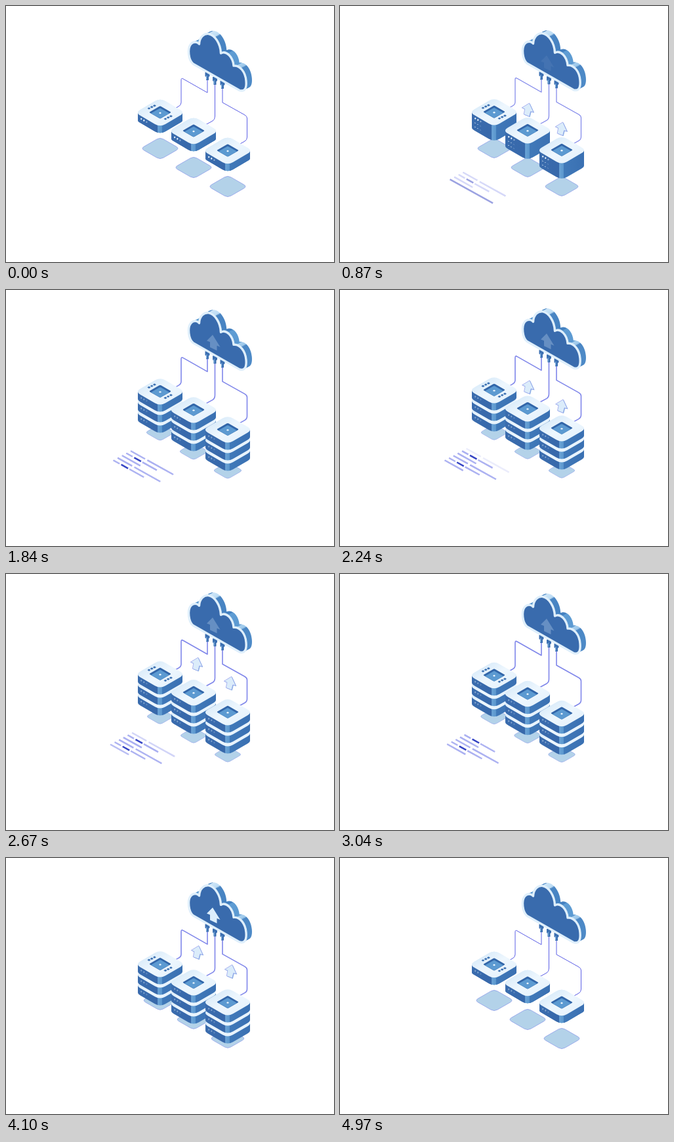
Write an HTML page that moves like this. It is 500 px wide and 390 px high and loops after 5000 ms.

```html
<!DOCTYPE html>
<html lang="en">
<head>
<meta charset="utf-8">
<title>Cloud servers</title>
<style>
html, body { margin: 0; width: 100%; height: 100%; overflow: hidden; background: #fff; }
svg { display: block; width: 500px; height: 390px; }
</style>
</head>
<body>
<svg id="stage" viewBox="0 0 500 390">
  <defs>
    <linearGradient id="side" gradientUnits="userSpaceOnUse" x1="-34" x2="34" y1="0" y2="0">
      <stop offset="0" stop-color="#3a6cae"/><stop offset=".44" stop-color="#3768aa"/>
      <stop offset=".45" stop-color="#6aa3d6"/><stop offset=".54" stop-color="#5a96cd"/>
      <stop offset=".55" stop-color="#4079b9"/><stop offset="1" stop-color="#3a70b2"/>
    </linearGradient>
    <linearGradient id="lid" x1="0" y1="0" x2="1" y2="1">
      <stop offset="0" stop-color="#cfe5f7"/><stop offset=".5" stop-color="#eef7fe"/><stop offset="1" stop-color="#e2f0fb"/>
    </linearGradient>
    <linearGradient id="rim" gradientUnits="userSpaceOnUse" x1="280" x2="377" y1="0" y2="0">
      <stop offset=".2" stop-color="#5b99d1"/><stop offset=".27" stop-color="#4a86c4"/>
      <stop offset=".28" stop-color="#cfe6f8"/><stop offset=".38" stop-color="#bcdcf4"/>
      <stop offset=".39" stop-color="#4a86c4"/><stop offset=".58" stop-color="#4380c0"/>
      <stop offset=".59" stop-color="#5f9dd4"/><stop offset=".72" stop-color="#5b99d1"/>
      <stop offset=".73" stop-color="#a9d0ee"/><stop offset=".79" stop-color="#9cc7ea"/>
      <stop offset=".8" stop-color="#4a86c4"/><stop offset="1" stop-color="#5390cb"/>
    </linearGradient>
  </defs>
  <g id="shadows"></g>
  <g id="float">
    <g id="cables" fill="none" stroke-linejoin="round"></g>
    <g id="arrows"></g>
    <g id="cloud"></g>
    <g id="servers"></g>
    <g id="code" fill="none"></g>
  </g>
</svg>
<script>
const LOOP = 5000;
const $ = id => document.getElementById(id);
const clamp = v => Math.min(1, Math.max(0, v));
const ramp = (t, from, to) => clamp((t - from) / (to - from));
const ease = p => (1 - Math.cos(Math.PI * p)) / 2;
const swell = p => Math.sin(Math.PI * p) ** 2;

// Isometric tile with rounded corners; w and h are the half sizes before rounding.
function tile(w, h, x = 0, y = 0, cut = 0.21) {
  const corners = [[0, -h], [w, 0], [0, h], [-w, 0]];
  const mix = (a, b) => [0, 1].map(k => a[k] + (b[k] - a[k]) * cut);
  const at = p => `${(p[0] + x).toFixed(2)} ${(p[1] + y).toFixed(2)}`;
  return corners.map((c, i) => {
    const prev = corners[(i + 3) % 4], next = corners[(i + 1) % 4];
    return `${i ? 'L' : 'M'}${at(mix(c, prev))}Q${at(c)} ${at(mix(c, next))}`;
  }).join('') + 'Z';
}

const SPOTS = [[235, 162.5, 217], [286, 190.5, 246], [338, 220.5, 275]];
const BODY = 11, PITCH = 16;

const leds = `<g class="led" fill="#eaf5ff">${[0, 1, 2].map(i =>
  `<ellipse cx="${-28.8 + i * 4.1}" cy="${9.6 + i * 2.3}" rx="1.1" ry="1.3" opacity="${i < 2 ? 1 : 0.5}"/>`).join('')}</g>`;
const box = `<path fill="url(#side)" d="${tile(38, 22, 0, BODY)}M-34 0H34V${BODY}H-34Z"/>
  <path fill="url(#lid)" d="${tile(38, 22)}"/>${leds}`;
const chip = `<path fill="#3266a9" d="${tile(17, 9.8, 0, -0.5, 0.08)}"/>
  <path fill="#5c9ad1" d="${tile(14, 8, 0, 1, 0.08)}"/>
  <ellipse cy=".5" rx="1.6" ry="1.2" fill="#eef8ff"/>`;
const vents = [[-17, -6.5], [8, 9.5]].map(([x, y]) => [0, 1, 2].map(i =>
  `<path fill="#3a6fb1" d="${tile(2.6, 1.7, x + i * 4.2, y - i * 2.1, 0.05)}"/>`).join('')).join('');

$('servers').innerHTML = SPOTS.map(([x, y], n) => `<g transform="translate(${x} ${y})">
  ${[2, 1, 0].map(k => `<g class="layer" data-k="${k}">${box}</g>`).join('')}
  ${chip}${n ? '' : vents}</g>`).join('');
$('shadows').innerHTML = SPOTS.map(() =>
  `<path d="${tile(29.5, 17, 0, 0, 0.17)}" fill="#b3d2e9" stroke="#8f9eea" stroke-width=".8"/>`).join('');

$('cables').innerHTML = [
  'M307 110V132L270 111Q267 109 267 113V147Q267 151 263 153L256 157',
  'M318.5 118V168Q318.5 173 315 175L304 181',
  'M330 124V147L364 166Q367.5 168 367.5 171V200Q367.5 204 364 206L355 211'
].map(d => `<path d="${d}"/>`).join('');

const CLOUD = 'M285 88C278 82 276.500 65 281.500 58.500C285 54 291 54 294.500 58C295 47 302 41.500 309 42.500' +
  'C318 44 327 57 327.500 72C336 67 346 78 347 91C357 90 365 101 366 114C367 125 364 131 356 128.500Z';
const rim = Array.from({ length: 11 }, (_, i) =>
  `<path d="${CLOUD}" fill="url(#rim)" transform="translate(${8.8 - i * 0.88} ${-4.6 + i * 0.46})"/>`).join('');
const plugs = [[307, 101], [318.5, 108], [330, 114]].map(([x, y]) =>
  `<path fill="#3c70b2" d="M${x - 3.5} ${y}h7v6l-1.500 1v5h-4v-5l-1.500 -1z"/>
   <path fill="#7fb0de" d="M${x - 2} ${y + 5}h1.300v6h-1.300z"/>`).join('');
$('cloud').innerHTML = `${plugs}${rim}
  <path d="${CLOUD}" fill="#396bad" stroke="#dfeffb" stroke-width="3.400" stroke-linejoin="round"/>
  <path id="upload" fill="#dceefc" d="M315 76L306 85L311 87V95L321.500 100V92.500L326.500 94.500Z"/>`;

const ARROW = 'M2.500 -9.500L-9 -2.500L-4.500 -.5L-6 7.500L2.500 11L4.500 3.300L9 4.500Z';
$('arrows').innerHTML = [0, 1].map(() => `<g>
  <path d="${ARROW}" fill="#8fbce4" transform="translate(1 .8)"/>
  <path d="${ARROW}" fill="#dbecfa" stroke="#7d86e8" stroke-width=".6"/></g>`).join('');

// Code rows: pieces are [start, end, bold] along the row.
const ROWS = {
  A: [[0, 28]],
  B: [[0, 22], [25.5, 65]],
  C: [[0, 9.5], [12, 22.5, 1], [24.5, 46.5]],
  E: [[0, 65.5, 1]]
};
const SLOPE = 0.555;
const piece = ([a, b, bold]) => {
  const d = `M${a} ${a * SLOPE}L${b} ${b * SLOPE}`;
  return bold
    ? `<path d="${d}" stroke="#3443c4" stroke-width="2.500"/>`
    : `<path d="${d}" stroke="#8388ea" stroke-width="2.100"/><path d="${d}" stroke="#e4ecfc" stroke-width=".7"/>`;
};
$('code').innerHTML = [...'EACBACBACBACBACBE'].map(r => `<g>${ROWS[r].map(piece).join('')}</g>`).join('');

const layers = [...document.querySelectorAll('.layer')];
const lights = [...document.querySelectorAll('.led')];

function drawCode(t) {
  const scroll = 13.2 * ease(ramp(t, 1000, 3870));
  $('code').setAttribute('opacity', ramp(t, 700, 1050) * (1 - ramp(t, 3720, 4080)));
  [...$('code').children].forEach((row, i) => {
    const slot = i - scroll;
    row.setAttribute('transform', `translate(${167.6 + slot * 6.6} ${264.8 - slot * 3.55})`);
    row.setAttribute('opacity', clamp((slot + 1.5) / 0.25) * clamp((3.85 - slot) / 0.25));
  });
}

function drawArrows(t) {
  const phase = t < 530 || t > 4490 ? 0 : ((t - 530) % 1320) / 1000;
  const alpha = ramp(phase, 0.08, 0.26) * (1 - ramp(phase, 0.95, 1.12));
  [...$('arrows').children].forEach((arrow, i) => {
    const x = 283.2 + 8.7 * phase + i * 51, y = 166.6 - 24.6 * phase + i * 29;
    arrow.setAttribute('transform', `translate(${x} ${y})`);
    arrow.setAttribute('opacity', alpha);
  });
  const glow = 0.28 * ramp(t, 700, 1400) + 0.32 * ramp(t, 3040, 3440) + 0.4 * ramp(t, 3440, 4000);
  $('upload').setAttribute('opacity', glow * (1 - ramp(t, 4200, 4480)));
}

function draw(t) {
  const lift = -10 * swell(ramp(t, 530, 4400));
  const open = ease(ramp(t, 530, 1330)) * (1 - ease(ramp(t, 4250, 4960)));
  const shrink = 1 - 0.28 * swell(t / LOOP);
  const lit = t < 1700 || (t > 3240 && t < 3800);

  $('float').setAttribute('transform', `translate(0 ${lift})`);
  [...$('shadows').children].forEach((s, i) =>
    s.setAttribute('transform', `translate(${SPOTS[i][0]} ${SPOTS[i][2]}) scale(${shrink})`));
  layers.forEach(l => l.setAttribute('transform', `translate(0 ${l.dataset.k * PITCH * open})`));
  lights.forEach(l => l.setAttribute('opacity', lit ? 1 : 0.4));
  $('cables').setAttribute('stroke', open > 0.3 ? '#7f86ea' : '#5d60e6');
  $('cables').setAttribute('stroke-width', 1 + 0.6 * open);
  drawArrows(t);
  drawCode(t);
}

const start = performance.now();
function tick() {
  draw((performance.now() - start) % LOOP);
  requestAnimationFrame(tick);
}
draw(0);
requestAnimationFrame(tick);
</script>
</body>
</html>
```
